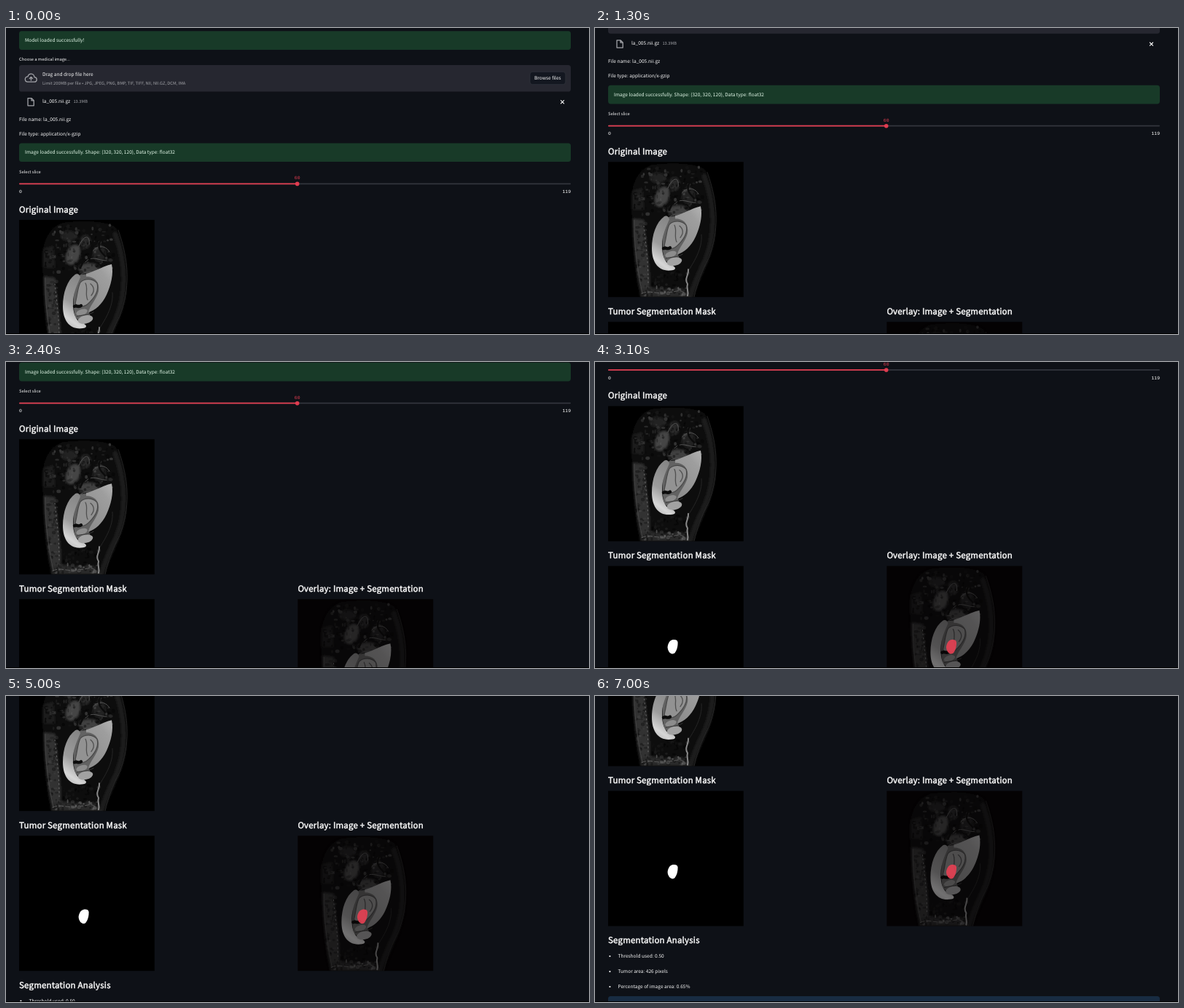
Animation of 800 by 421 pixels, one loop 8000 ms. Source, as an HTML page:

```html
<!DOCTYPE html>
<html lang="en">
<head>
<meta charset="utf-8">
<title>Scan viewer</title>
<style>
  html, body { margin: 0; width: 100%; height: 100%; overflow: hidden; background: #0e1117; }
  svg { display: block; width: 800px; height: 421px; }
  text {
    font: 6.57px "Noto Sans CJK JP", "Noto Sans CJK SC", "Noto Sans CJK KR", "Noto Sans CJK", "Open Sans", sans-serif;
    fill: #fafafa; text-rendering: geometricPrecision; white-space: pre;
  }
  text.small { font-size: 5.75px; }
  text.dim { fill: #a3a4a9; }
  text.ok { fill: #e6fbec; }
  text.head { font-size: 11.49px; letter-spacing: .2px; stroke: #fafafa; stroke-width: .46px; }
  text.mono { font: 6.42px "Liberation Mono", "Noto Sans Mono", monospace; }
  text.mark { fill: #e03c50; text-anchor: middle; }
  text.end { text-anchor: end; }
  .line { fill: none; stroke-linecap: round; stroke-linejoin: round; }
</style>
</head>
<body>
<svg viewBox="0 0 800 421" xmlns="http://www.w3.org/2000/svg">
  <defs>
    <clipPath id="frame"><rect width="185.8" height="185.9"/></clipPath>
    <filter id="soft" x="-20%" y="-20%" width="140%" height="140%"><feGaussianBlur stdDeviation="1.5"/></filter>
    <filter id="crisp" x="-10%" y="-10%" width="120%" height="120%"><feGaussianBlur stdDeviation=".6"/></filter>
    <linearGradient id="crescent" x1=".6" y1="0" x2=".3" y2="1">
      <stop offset="0" stop-color="#858585"/><stop offset=".55" stop-color="#9c9c9c"/>
      <stop offset=".85" stop-color="#d6d6d6"/><stop offset="1" stop-color="#bcbcbc"/>
    </linearGradient>
    <linearGradient id="chamber" x1="1" y1="0" x2=".3" y2="1">
      <stop offset="0" stop-color="#b4b4b4"/><stop offset=".3" stop-color="#9e9e9e"/>
      <stop offset="1" stop-color="#8e8e8e"/>
    </linearGradient>
    <g id="scan" clip-path="url(#frame)">
      <g filter="url(#soft)">
        <path fill="#0f0f0f" d="M32 66C30 40 36 12 60 4C90 0 120 2 132 10C146 30 150 70 146 108C140 140 124 165 118 186H44C36 150 35 100 32 66Z"/>
        <path fill="#1c1c1c" d="M33 40L47 36L49 66L33 65Z"/>
        <path fill="#303030" d="M34 78L49 80C50 105 56 130 57 164C57 176 54 182 46 183C38 150 34 110 34 78Z"/>
        <path class="line" stroke="#1f1f1f" stroke-width="6" d="M132 20C147 60 148 100 133 136C123 156 117 170 113 186"/>
        <ellipse cx="74" cy="48" rx="9" ry="14" transform="rotate(22 74 48)" fill="#454545"/>
        <ellipse cx="68" cy="22" rx="11" ry="7" fill="#202020"/>
        <ellipse cx="96" cy="67" rx="14" ry="7" fill="#404040"/>
        <ellipse cx="110" cy="46" rx="9" ry="11" fill="#242424"/>
        <ellipse cx="91" cy="30" rx="7" ry="9" fill="#2c2c2c"/>
        <path fill="#070707" d="M52 82C56 66 68 68 74 72C62 84 57 104 58 124L60 150C76 160 98 152 112 128L122 132C118 148 108 160 104 172C84 178 66 176 60 172C58 140 54 110 52 82Z"/>
        <path fill="#2c2c2c" d="M45 176C58 169 72 178 88 174C98 176 106 170 112 186H45Z"/>
      </g>
      <g filter="url(#crisp)">
        <g id="grain"></g>
        <path class="line" stroke="#454545" d="M36 80C35 110 40 148 47 181"/>
        <path class="line" stroke="#666" stroke-width="1.1" stroke-dasharray="1.5 4" d="M49 88C51 110 55 130 55 166"/>
        <path class="line" stroke="#2c2c2c" stroke-width=".8" d="M136 14C152 58 152 96 138 132C128 152 122 168 118 186M128 100C130 120 116 140 110 150"/>
        <path class="line" stroke="#555" d="M82 36C90 18 98 22 96 34M99 46C106 34 118 34 124 44M91 58C100 48 108 56 120 56M84 76C90 70 98 74 110 68"/>
        <path class="line" stroke="#0c0c0c" stroke-width="2.4" d="M86 46C90 54 88 58 84 66M98 30C104 38 98 48 96 56M112 28C106 38 112 44 118 50"/>
        <path fill="#626262" d="M80 77C92 72 106 76 112 82L108 112L96 128L100 138L88 144L77 134C73 118 74 98 80 77Z"/>
        <path fill="url(#crescent)" d="M77 75C66 83 60 100 60 119C60 139 70 152 88 149C95 148 92 143 86 142C76 138 74 126 74 114C74 100 80 89 84 79C83 75 80 73 77 75Z"/>
        <path fill="url(#chamber)" d="M92 74C102 72 114 64 127 61C130 74 126 90 120 103C114 116 104 125 95 127C97 118 107 108 109 98C111 86 104 78 92 78Z"/>
        <path fill="#929292" stroke="#484848" stroke-width="1.2" d="M84 86C90 80 101 80 107 87C110 98 103 107 97 113C91 120 81 122 77 115C80 104 80 94 84 86Z"/>
        <path class="line" stroke="#505050" stroke-width="1.3" d="M91 87C95 94 90 102 94 110M98 88C103 92 104 98 99 104"/>
        <path class="line" stroke="#0c0c0c" stroke-width="4.4" d="M76 119C79 117 82 121 85 118"/>
        <ellipse cx="86" cy="127" rx="8" ry="4" transform="rotate(-18 86 127)" fill="#8c8c8c"/>
        <ellipse cx="91" cy="137" rx="10.5" ry="5.6" transform="rotate(-12 91 137)" fill="#a2a2a2"/>
        <path class="line" stroke="#3a3a3a" d="M79 133C86 130 94 132 102 127"/>
        <path class="line" stroke="#8a8a8a" stroke-width="2" d="M110 148C111 156 104 160 109 168C107 174 111 178 109 184"/>
        <path class="line" stroke="#5c5c5c" stroke-dasharray="6 3" d="M46 181C58 175 70 184 82 179C92 180 98 174 104 180"/>
      </g>
    </g>
    <path id="blob" d="M88 101.6C92 100.8 95.2 101.6 95.6 105C95.8 111 94 117.5 90.5 120.4C86 122.6 81.6 117 81.6 111.5C82 106.5 84.5 102.8 88 101.6Z"/>
  </defs>

  <rect width="800" height="421" fill="#0e1117"/>
  <g id="page">
    <g fill="#183a28">
      <rect x="18" y="4.3" width="757" height="25.6" rx="3.6"/>
      <rect x="18" y="158.5" width="757" height="25.6" rx="3.6"/>
    </g>
    <rect x="18" y="51" width="757" height="36.5" rx="3.6" fill="#262730"/>
    <rect x="719" y="60.3" width="48.8" height="17.4" rx="3.6" fill="#131720" stroke="#3b3e47" stroke-width=".5"/>
    <g class="line" stroke="#a3a4a9" stroke-width="1.3">
      <path d="M30 74.2C25 73.8 25.2 67 30 66.8C31.5 61.6 38.2 62 39 67.6C43.2 67.8 43.2 74 39 74.2ZM34.4 72V67.6M32.3 69.5L34.4 67.4L36.5 69.5"/>
      <path d="M30 96.6H35.2L38.2 99.6V106.8H30ZM35 96.8V99.8H38"/>
      <path stroke="#fafafa" stroke-width="1.1" d="M761.4 99.7L765.6 103.9M765.6 99.7L761.4 103.9"/>
    </g>
    <rect x="18" y="213.4" width="757" height="1.8" rx=".9" fill="#32353d"/>
    <rect x="18" y="213.4" width="381.7" height="1.8" rx=".9" fill="#e03c50"/>
    <circle cx="399.7" cy="214.4" r="2.8" fill="#e03c50"/>

    <rect x="18" y="264" width="185.8" height="185.9"/>
    <use href="#scan" x="18" y="264"/>
    <rect x="18" y="484" width="185.8" height="185.9"/>
    <use href="#blob" x="18" y="484" fill="#fff"/>
    <rect x="400.4" y="484" width="185.8" height="185.9" fill="#040203"/>
    <use href="#scan" x="400.4" y="484" opacity=".52"/>
    <use href="#blob" x="400.4" y="484" fill="#e44052" opacity=".92"/>

    <g fill="#fafafa">
      <circle cx="20.4" cy="711.4" r="1.1"/>
      <circle cx="20.4" cy="732.5" r="1.1"/>
      <circle cx="20.4" cy="753.4" r="1.1"/>
    </g>
    <rect x="18" y="766.4" width="757" height="25.6" rx="3.6" fill="#182c42"/>
    <g id="labels"></g>
  </g>
  <rect y="420" width="800" height="1"/>
</svg>
<script>
const NS = "http://www.w3.org/2000/svg";
const $ = id => document.getElementById(id);

function add(parent, tag, attrs, text = "") {
  const el = document.createElementNS(NS, tag);
  for (const key in attrs) el.setAttribute(key, attrs[key]);
  el.textContent = text;
  parent.append(el);
}

// Class, x, baseline, text
[
  ["ok", 26, 19.3, "Model loaded successfully!"],
  ["small", 18, 45, "Choose a medical image..."],
  ["", 50, 66, "Drag and drop file here"],
  ["small dim", 50, 78, "Limit 200MB per file • JPG, JPEG, PNG, BMP, TIF, TIFF, NII, NII.GZ, DCM, IMA"],
  ["", 725, 71.3, "Browse files"],
  ["", 50, 103.2, "la_005.nii.gz"],
  ["small dim", 92.4, 103, "13.3MB"],
  ["", 18, 127.9, "File name: la_005.nii.gz"],
  ["", 18, 147.5, "File type: application/x-gzip"],
  ["ok", 26, 173.3, "Image loaded successfully. Shape: (320, 320, 120), Data type: float32"],
  ["small", 18, 199.5, "Select slice"],
  ["mono mark", 399.7, 208.4, "60"],
  ["mono", 18, 227, "0"],
  ["mono end", 775, 227, "119"],
  ["head", 18, 253.8, "Original Image"],
  ["head", 18, 473.8, "Tumor Segmentation Mask"],
  ["head", 400.4, 473.8, "Overlay: Image + Segmentation"],
  ["head", 18, 693.8, "Segmentation Analysis"],
  ["", 31.5, 713.4, "Threshold used: 0.50"],
  ["", 31.5, 734.5, "Tumor area: 426 pixels"],
  ["", 31.5, 755.4, "Percentage of image area: 0.65%"]
].forEach(([cls, x, y, text]) => add($("labels"), "text", { class: cls, x, y }, text));

// Mottled tissue
let seed = 11;
const rand = () => (seed = seed * 16807 % 2147483647) / 2147483647;

function mottle(count, x, y, w, h, peak, opacity) {
  for (let i = 0; i < count; i++) {
    const tone = Math.round(rand() ** 2 * peak);
    add($("grain"), "ellipse", {
      cx: x + rand() * w, cy: y + rand() * h,
      rx: .8 + rand() * 2.2, ry: .8 + rand() * 2,
      fill: `rgb(${tone},${tone},${tone})`, opacity
    });
  }
}
mottle(170, 46, 7, 84, 66, 110, .45);
mottle(25, 35, 38, 12, 28, 70, .5);
mottle(60, 38, 84, 14, 88, 90, .35);
mottle(40, 60, 150, 50, 20, 45, .5);
mottle(50, 48, 172, 60, 12, 150, .5);

const LOOP = 8000, STEP = 100;
const KEYS = [[0, 0], [1300, 79.7], [2400, 157.7], [3800, 244], [5000, 291.7], [5900, 325.7], [7000, 353.4]];

function slope(i) {
  const [t0, y0] = KEYS[Math.max(i - 1, 0)];
  const [t1, y1] = KEYS[Math.min(i + 1, KEYS.length - 1)];
  return (y1 - y0) / (t1 - t0);
}

// Smooth Hermite curve through the scroll positions
function scrollAt(t) {
  const last = KEYS.length - 1;
  if (t >= KEYS[last][0]) return KEYS[last][1];
  const i = KEYS.findIndex(key => key[0] > t) - 1;
  const [t0, y0] = KEYS[i], [t1, y1] = KEYS[i + 1];
  const d = t1 - t0, u = (t - t0) / d, v = 1 - u;
  return y0 * (1 + 2 * u) * v * v + slope(i) * d * u * v * v
       + y1 * u * u * (3 - 2 * u) - slope(i + 1) * d * u * u * v;
}

function draw(time) {
  const t = Math.floor(time % LOOP / STEP) * STEP;
  $("page").setAttribute("transform", `translate(0 ${-scrollAt(t).toFixed(2)})`);
}

function tick() {
  draw(performance.now());
  requestAnimationFrame(tick);
}
tick();
</script>
</body>
</html>
```
